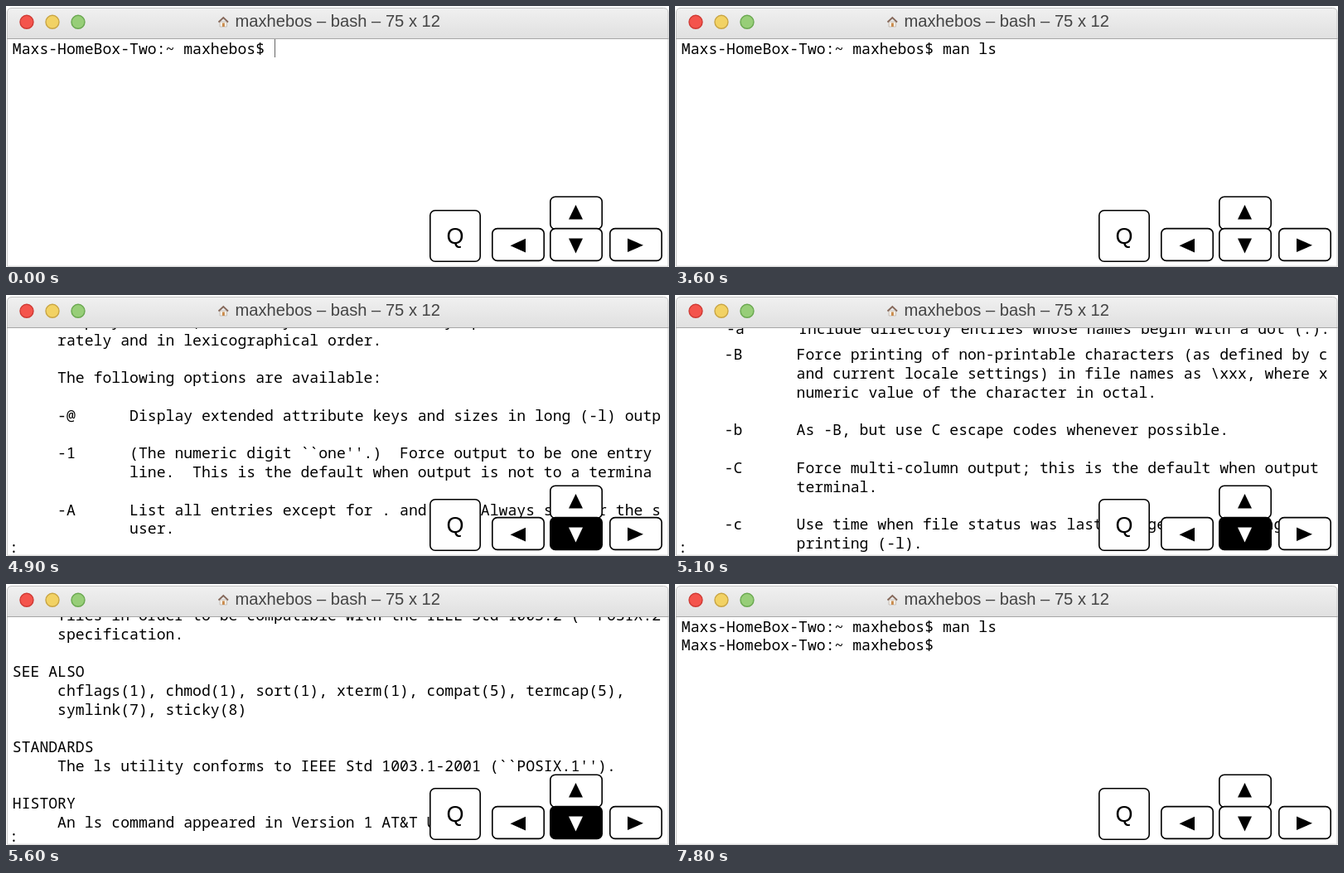
These frames come from a looping animation (800 px wide and 315 px high, 8 s). An HTML page:

```html
<!DOCTYPE html>
<html lang="en">
<head>
<meta charset="utf-8">
<title>Reading a manual page</title>
<style>
html, body { margin: 0; width: 100%; height: 100%; overflow: hidden; background: #fff; }
svg { display: block; width: 800px; height: 315px; }
text { white-space: pre; }
.mono { font: 18.13px "Noto Sans Mono", monospace; }
.sans { font-family: "Liberation Sans", Arial, sans-serif; }
.key rect { fill: #fff; stroke: #000; stroke-width: 1.6; }
.key.down rect { fill: #000; }
.key.down path, .key.down text { fill: #fff; }
</style>
</head>
<body>
<svg viewBox="0 0 800 315">
  <defs>
    <linearGradient id="bar" x2="0" y2="1">
      <stop stop-color="#f0f0f0"/><stop offset="1" stop-color="#e0e0e0"/>
    </linearGradient>
  </defs>
  <path d="M1.5 38V314.2H799V38" fill="none" stroke="#cbcbcb"/>
  <g class="mono">
    <g id="page"></g>
    <text id="first" x="7.8" y="57.8"></text>
    <text id="second" x="7.8" y="80.4">Maxs-Homebox-Two:~ maxhebos$</text>
    <text id="colon" x="4" y="310.5">:</text>
  </g>
  <rect id="cursor" width="1" height="22" fill="#666"/>

  <path d="M1.5 39.5V8Q1.5 2.5 7 2.5H793.5Q799 2.5 799 8V39.5Z" fill="url(#bar)" stroke="#c4c4c4"/>
  <path d="M1 39.5H799.5" stroke="#a6a6a6"/>
  <g stroke-width="1.4">
    <circle cx="25" cy="19.3" r="8" fill="#f4544c" stroke="#cf3a34"/>
    <circle cx="56" cy="19.3" r="8" fill="#f2d264" stroke="#c9a544"/>
    <circle cx="87" cy="19.3" r="8" fill="#97ce78" stroke="#6aa850"/>
  </g>
  <path d="M258 19H266.5V25H258Z" fill="#f3eee6" stroke="#b9b0a6" stroke-width=".7"/>
  <path d="M261 20.5H263.8V25H261Z" fill="#c98a4a"/>
  <path d="M256.5 19.5L262.3 14L268 19.5" fill="none" stroke="#85685a" stroke-width="1.8"/>
  <text class="sans" x="276.5" y="25" font-size="20.15" fill="#444">maxhebos – bash – 75 x 12</text>

  <g class="key" id="quit">
    <rect x="511.8" y="246.8" width="60.4" height="61.4" rx="6"/>
    <text class="sans" x="542" y="287.3" font-size="27" text-anchor="middle">Q</text>
  </g>
  <g class="key"><rect x="656.8" y="230.3" width="62.4" height="39" rx="6"/><path d="M679 257.5L687.5 240L696 257.5Z"/></g>
  <g class="key"><rect x="586.8" y="268.6" width="62.4" height="38.8" rx="6"/><path d="M608.5 289.2L627 280.8V297.6Z"/></g>
  <g class="key" id="scroll"><rect x="656.8" y="268.6" width="62.4" height="38.8" rx="6"/><path d="M679 280.5H696L687.5 298.5Z"/></g>
  <g class="key"><rect x="728.8" y="268.6" width="62.4" height="38.8" rx="6"/><path d="M769 288.8L750 280.5V297.1Z"/></g>
</svg>
<script>
const manual = `LS(1)                     BSD General Commands Manual

NAME
     ls -- list directory contents

SYNOPSIS
     ls [-ABCFGHLOPRSTUW@abcdefghiklmnopqrstuwx1] [file ...]

DESCRIPTION
     For each operand that names a file of a type other than directory,
     displays its name as well as any requested, associated information.
     each operand that names a file of type directory, ls displays the n
     of files contained within that directory, as well as any requested,
     ciated information.

     If no operands are given, the contents of the current directory are
     played.  If more than one operand is given, non-directory operands
     displayed first; directory and non-directory operands are sorted se
     rately and in lexicographical order.

     The following options are available:

     -@      Display extended attribute keys and sizes in long (-l) outp

     -1      (The numeric digit \`\`one''.)  Force output to be one entry
             line.  This is the default when output is not to a termina

     -A      List all entries except for . and ...  Always set for the s
             user.

     -a      Include directory entries whose names begin with a dot (.).

     -B      Force printing of non-printable characters (as defined by c
             and current locale settings) in file names as \\xxx, where x
             numeric value of the character in octal.

     -b      As -B, but use C escape codes whenever possible.

     -C      Force multi-column output; this is the default when output
             terminal.

     -c      Use time when file status was last changed for sorting (-t)
             printing (-l).

     -d      Directories are listed as plain files (not searched recurs

     The -1, -C, -x, and -l options all override each other; the last on
     specified determines the format used.

     By default, ls lists one entry per line to standard output; the exce
     tions are to terminals or when the -C or -x options are specified.

     File information is displayed with one or more <blank>s separating t
     information associated with the -i, -s, and -l options.

EXAMPLES
     The following is how to do an ls listing sorted by increasing size

           ls -lrS

COMPATIBILITY
     The group field is now automatically included in the long listing f
     files in order to be compatible with the IEEE Std 1003.2 (\`\`POSIX.2
     specification.

SEE ALSO
     chflags(1), chmod(1), sort(1), xterm(1), compat(5), termcap(5),
     symlink(7), sticky(8)

STANDARDS
     The ls utility conforms to IEEE Std 1003.1-2001 (\`\`POSIX.1'').

HISTORY
     An ls command appeared in Version 1 AT&T UNIX.

BUGS
     To maintain backward compatibility, the relationships between the m
     options are quite complex.

BSD                              May 19, 2002
(END)`;

const LOOP = 8000, PITCH = 22.75, STEP = 143.4;
const PROMPT = 'Maxs-HomeBox-Two:~ maxhebos$ ';
const $ = id => document.getElementById(id);
const clamp = (v, lo, hi) => Math.max(lo, Math.min(hi, v));
const show = (el, on) => el.setAttribute('visibility', on ? 'visible' : 'hidden');

// The page has three sections: the opening, the option list, and the rest from EXAMPLES on.
const OPTIONS = 32, EXAMPLES = 55;
const rows = manual.split('\n').map((line, i) => {
  const el = document.createElementNS('http://www.w3.org/2000/svg', 'text');
  const y = 81.7 + i * PITCH - (i >= OPTIONS ? 14.3 : 0);
  el.textContent = line;
  el.setAttribute('x', i >= OPTIONS && i <= 46 ? 5.3 : 7.8);
  el.setAttribute('y', y);
  $('page').append(el);
  return { el, y, top: i < EXAMPLES ? 24 : 11 };
});

function draw(t) {
  const within = (a, b) => t >= a && t < b;
  const reading = within(4100, 6800);
  const step = clamp(Math.floor((t - 4600) / 100), 0, 11);
  const typed = clamp(Math.floor((t - 1500) / 100), 0, 6);
  const offset = step * STEP;

  $('page').setAttribute('transform', `translate(0 ${-offset})`);
  rows.forEach(({ el, y, top }, i) =>
    show(el, reading && y - offset > top && (step > 0 || i < 10)));

  $('first').textContent = PROMPT + 'man ls'.slice(0, typed);
  show($('first'), !reading || step === 0);
  show($('second'), t >= 6800);
  show($('colon'), within(4100, 5700));

  const back = t >= 6800;
  $('cursor').setAttribute('x', back ? 322.5 : Math.min(387, Math.round(324 + typed * 10.9)));
  $('cursor').setAttribute('y', back ? 64 : 40);
  show($('cursor'), within(0, 500) || within(1000, 1500) || within(1600, 2600) ||
    within(3100, 3600) || within(7300, 7800));

  $('scroll').classList.toggle('down', within(4600, 5800));
  $('quit').classList.toggle('down', within(6300, 7300));
}

let start;
function frame(now) {
  start ??= now;
  draw((now - start) % LOOP);
  requestAnimationFrame(frame);
}
draw(0);
requestAnimationFrame(frame);
</script>
</body>
</html>
```
